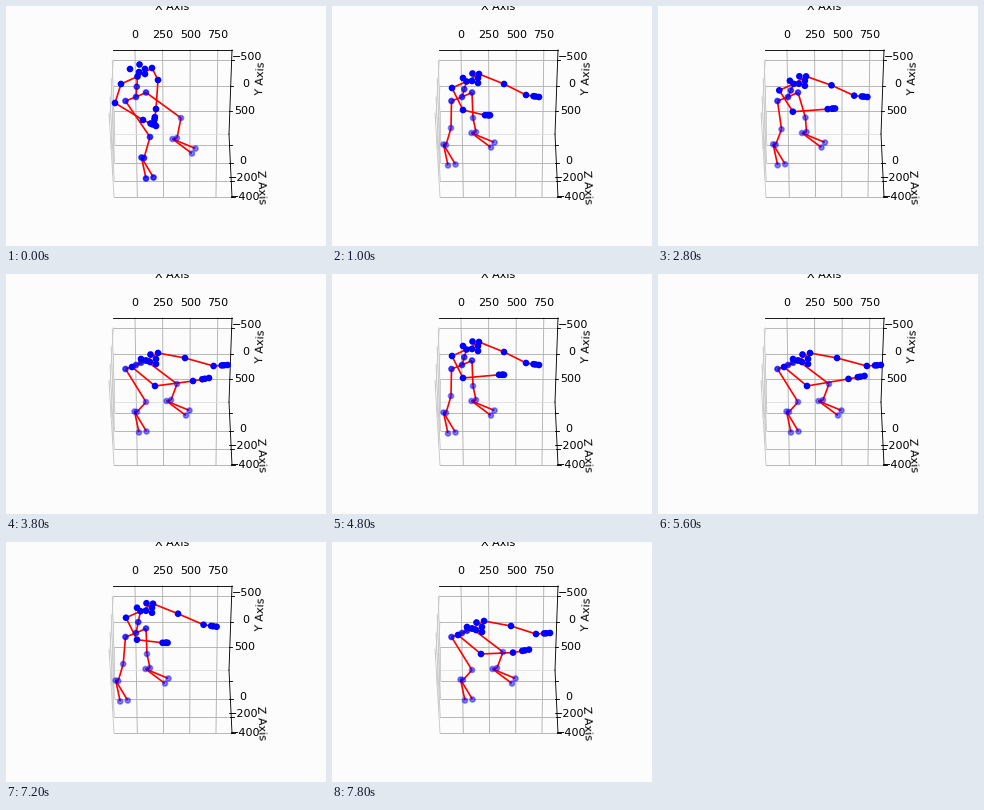
A matplotlib script for the animation above (8000 ms loop, 320 px wide and 240 px high).

```python
import numpy as np
import matplotlib.pyplot as plt
from matplotlib.animation import FuncAnimation
from matplotlib.collections import LineCollection

W, H, DPI = 320, 240, 80
STEP, COUNT = 200, 40
PERIOD = 1900  # one sway of the body, ms

plt.rcParams["font.family"] = "DejaVu Sans"
fig = plt.figure(figsize=(W / DPI, H / DPI), dpi=DPI, facecolor="#fcfcfc")
ax = fig.add_axes([0, 0, 1, 1])
ax.set(xlim=(0, W), ylim=(H, 0))
ax.axis("off")


def mix(a, b, k):
    return a + (b - a) * k


def ease(k):
    k = np.clip(k, 0, 1)
    return k * k * (3 - 2 * k)


# ---- fixed axes box -------------------------------------------------
TOP, FOLD, BOTTOM = 44, 128, 191


def rule(p, q, color="#b0b0b0"):
    ax.plot([p[0], q[0]], [p[1], q[1]], color=color, lw=0.8, zorder=1)


def label(x, y, s, rot=0):
    ax.text(x, y, s, fontsize=10, rotation=rot, ha="center",
            va="center" if rot else "center_baseline", zorder=2)


def edge(y, ends):
    return np.interp(y, [TOP, FOLD, BOTTOM], ends), y


def left(y):
    return edge(y, [107, 109, 108])


def right(y):
    return edge(y, [226, 223, 226])


y_grid = [54 + 25.7 * k for k in range(3)]
z_grid = [139, 157, 175, BOTTOM]

for k, s in enumerate(("0", "250", "500", "750")):
    x = 129 + 27.6 * k
    rule((x, TOP), (mix(x, 175, 0.05), BOTTOM))
    label(x, 28, s)
for y in y_grid + z_grid:
    rule(left(y), right(y))
    x, _ = right(y)
    rule((x - 1, y), (x + 2.5, y), "black")
rule(left(FOLD), right(FOLD), "#e0e0e0")

# Side wall, seen almost edge-on: y lines run in depth, z lines run in y.
far, near = np.array(left(TOP)), np.array((103, TOP + BOTTOM - FOLD))
far_low, near_low = np.array(left(FOLD)), np.array(left(BOTTOM))
for y in y_grid:
    k = (y - TOP) / (FOLD - TOP)
    rule(mix(far, far_low, k), mix(near, near_low, k), "#c8c8c8")
for z in z_grid:
    k = (z - FOLD) / (BOTTOM - FOLD)
    rule(mix(far, near, k), mix(far_low, near_low, k), "#c8c8c8")

rule(left(TOP), right(TOP), "black")
rule(right(TOP), right(FOLD), "black")
rule(right(FOLD), right(BOTTOM), "black")

for x, y, s in [(241, 50, "−500"), (239.5, 77, "0"), (238.5, 104, "500"),
                (236.5, 154, "0"), (237.5, 171, "−200"), (239.5, 190, "−400")]:
    label(x, y, s)
label(166, 0, "X Axis")
label(255, 72, "Y Axis", 87)
label(254.5, 181, "Z Axis", -87)


# ---- key poses ------------------------------------------------------
def pose(shoulders, elbows, wrists, tips, nose, knees, ankles):
    """Each pair is left, right; rows 0-7 arms, 8 nose, 9-12 legs."""
    return np.array([*shoulders, *elbows, *wrists, *tips, nose,
                     *knees, *ankles], float)


tuck = pose([(115, 78), (146, 62)], [(109, 97), (152, 74)],
            [(137, 114), (150, 103)], [(150, 120), (148, 117)], (133, 66),
            [(144, 131), (175, 112)], [(138, 152), (171, 132)])
stand = pose([(126, 93), (152, 79)], [(149, 112), (179, 84)],
             [(187, 107), (204, 92)], [(203, 104), (218, 91)], (144, 88),
             [(140, 128), (171, 110)], [(131, 138), (165, 126)])
lean = pose([(120, 82), (147, 68)], [(131, 104), (172, 78)],
            [(160, 105), (194, 89)], [(165, 105), (207, 91)], (140, 75),
            [(119, 122), (141, 112)], [(114, 139), (144, 126)])

RIGHT_HAND, LEFT_HAND = [5, 7], [4, 6]
UPPER, LEFT_LEG = slice(0, 9), [9, 11]


def pulse(t, peak, low=0.4, high=1):
    """Periodic bump between 0 and 1."""
    c = np.cos(2 * np.pi * (t - peak) / PERIOD)
    return ease((c - low) / (high - low))


def body(t):
    """Sway between standing and leaning, with a stretch before each lean."""
    sway = pulse(t, 5050, -0.25, 0.68)
    lift = pulse(t, 5150)
    stretch = pulse(t, 4350)
    p = mix(stand, lean, sway)
    p[UPPER, 1] -= 7 * lift
    p[LEFT_LEG, 0] -= 2 * lift

    p[[0, 1, 8]] += np.array((5, -7)) * stretch
    p[2:8] += np.array((1, -4)) * stretch
    p[9:11] += np.array((-1, 4)) * stretch
    p[11:] += np.array((-2, 7)) * stretch

    p[RIGHT_HAND, 0] += 5 * pulse(t, 5500)
    drift = np.interp(t, [1000, 2000, 3800, 4800, 6400, 7800],
                      [-7, 7, 0, 7, 0, -6])
    p[LEFT_HAND] += np.array((1, -0.6)) * drift
    return mix(tuck, p, ease(t / 1000))


# ---- skeleton -------------------------------------------------------
FACE = np.array([(-9, -3), (0.5, -7.5), (6, -3), (6, 2), (0, 0)])
ROOT, HIP_L, HIP_R = np.array([(130, 91), (119.5, 95), (140, 86.5)])


def hand(wrist, tip):
    return [mix(wrist, tip, k) for k in (0.58, 0.74, 1)]


def foot(ankle, *offsets):
    """Heel and two toes."""
    return [ankle + d for d in offsets]


def skeleton(t):
    sl, sr, el, er, wl, wr, tl, tr, nose, kl, kr, al, ar = body(t)
    chest = (sl + sr) / 2 + (1, 0.5)
    spine = (chest + ROOT) / 2
    hand_l, hand_r = hand(wl, tl), hand(wr, tr)
    foot_l = foot(al, (-2.5, -0.5), (2, 20.5), (9.5, 19.5))
    foot_r = foot(ar, (-4.5, 1), (18.5, 10.5), (15, 15.5))

    front = [chest, sl, sr, el, er, wl, wr, *hand_l, *hand_r, *(nose + FACE)]
    groups = [front, [spine, ROOT, HIP_L, HIP_R],
              [kl, al, *foot_l], [kr, ar, *foot_r]]
    lines = [[HIP_L, ROOT, HIP_R], [ROOT, spine, chest], [sl, chest, sr],
             [sl, el, wl, *hand_l], [sr, er, wr, *hand_r]]
    for hip, knee, ankle, (heel, toe, toe2) in (
            (HIP_L, kl, al, foot_l), (HIP_R, kr, ar, foot_r)):
        lines += [[hip, knee, ankle, heel, toe], [heel, toe2]]
    return groups, lines


bones = LineCollection([], colors="red", linewidths=1.5, zorder=3)
ax.add_collection(bones)
dots = ax.scatter([], [], s=20, linewidths=1.5, zorder=4)


def draw(i):
    t = i * STEP
    groups, lines = skeleton(t)
    closer = 0.3 * (1 - ease(t / 1000))
    alphas = (1, 0.7, 0.45 + closer, 0.45)  # paler with depth
    rgba = [(0, 0, 1, a) for g, a in zip(groups, alphas) for _ in g]
    bones.set_segments([np.array(line) for line in lines])
    dots.set_offsets(np.concatenate(groups))
    dots.set_facecolor(rgba)
    dots.set_edgecolor(rgba)
    return bones, dots


anim = FuncAnimation(fig, draw, frames=COUNT, interval=STEP,
                     repeat=True, repeat_delay=0, blit=False)
plt.show()
```
